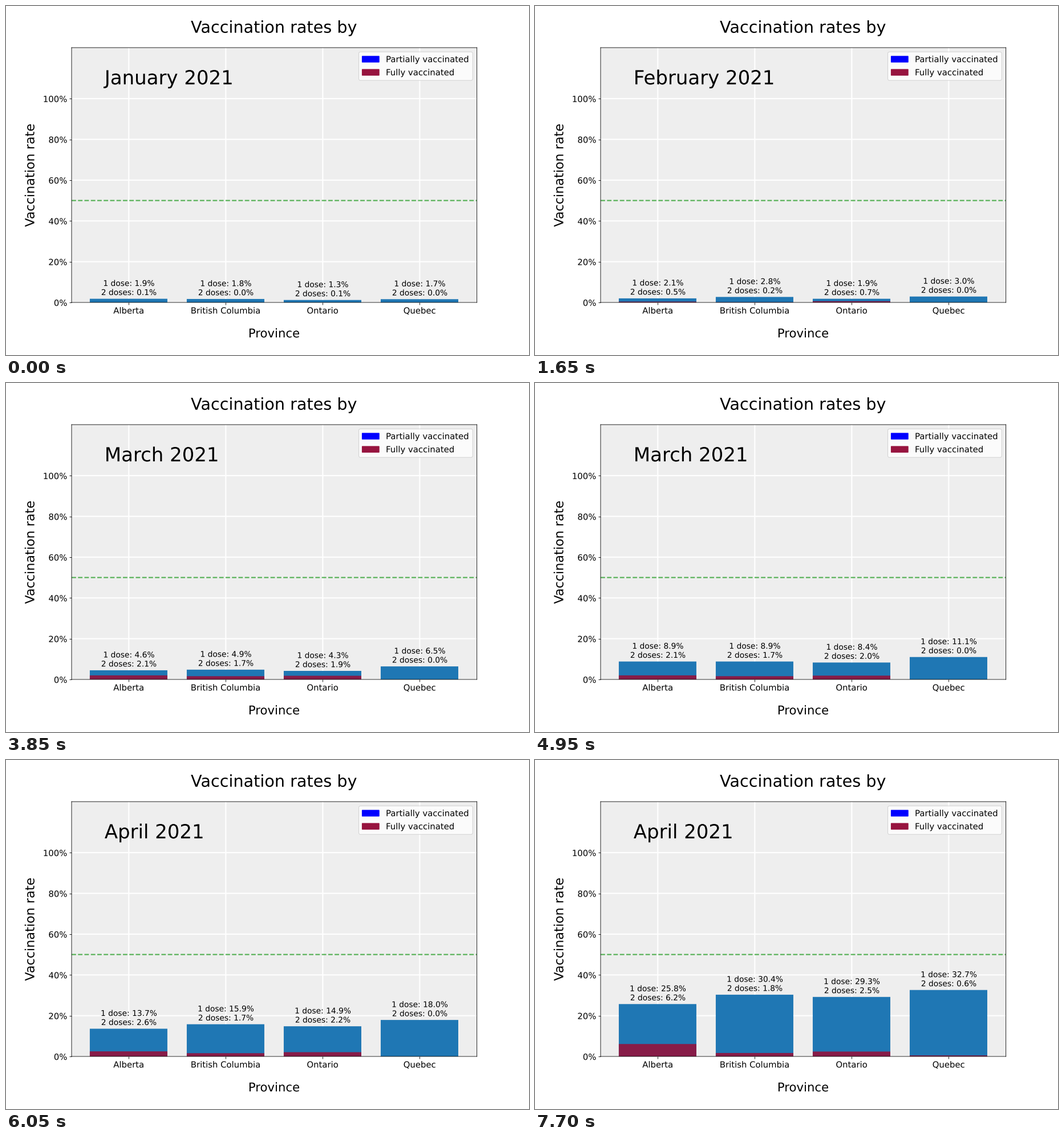
Animation, 917 px wide and 611 px high, one loop 8 s. Source, as a matplotlib script:

```python
import matplotlib.pyplot as plt
import numpy as np
from matplotlib.animation import FuncAnimation
from matplotlib.patches import Patch
from matplotlib.patheffects import Normal
from matplotlib.transforms import Affine2D

W, H, DPI = 917, 611, 64
K = 76.4 / DPI          # point scale: layout is sized for 12 x 8 inches
HALF = 0.38             # pixel offset of grid and frame lines against the bars
TICK_MS, HOLD, FRAMES = 50, 11, 160

PROVINCES = ["Alberta", "British Columbia", "Ontario", "Quebec"]
WEEKS = np.arange(15)

# vaccinated share in percent at a few key weeks, one row per province
FIRST_KEYS = [0, 3, 5, 7, 9, 11, 14]
FIRST = [
    [1.9, 2.1, 2.4, 4.6, 8.9, 13.7, 25.8],
    [1.8, 2.8, 3.2, 4.9, 8.9, 15.9, 30.4],
    [1.3, 1.9, 2.2, 4.3, 8.4, 14.9, 29.3],
    [1.7, 3.0, 4.1, 6.5, 11.1, 18.0, 32.7],
]
SECOND_KEYS = [0, 3, 5, 7, 10, 11, 14]
SECOND = [
    [0.1, 0.5, 1.5, 2.1, 2.1, 2.6, 6.2],
    [0.0, 0.2, 1.1, 1.7, 1.7, 1.7, 1.8],
    [0.1, 0.7, 1.6, 1.9, 2.0, 2.2, 2.5],
    [0.0, 0.0, 0.0, 0.0, 0.0, 0.0, 0.6],
]

# first doses grow exponentially between key weeks, second doses linearly
first = [np.exp(np.interp(WEEKS, FIRST_KEYS, np.log(row))) for row in FIRST]
second = [np.interp(WEEKS, SECOND_KEYS, row) for row in SECOND]

# outline text and unsnapped lines allow sub-pixel placement
plt.rcParams.update({
    "font.family": "DejaVu Sans",
    "font.size": 14 * K,
    "axes.linewidth": 0.8 * K,
    "patch.linewidth": 1.0 * K,
    "path.snap": False,
    "path.effects": [Normal()],
})

fig = plt.figure(figsize=(W / DPI, H / DPI), dpi=DPI, facecolor="white")
ax = fig.add_axes([0.125 + HALF / W, 0.15 + HALF / H, 0.775, 0.73])
ax.set_facecolor("#eeeeee")
ax.set_axisbelow(True)
ax.grid(color="white", linewidth=2 * K, linestyle="-")
ax.set_xticks(range(4), PROVINCES)
ax.set_yticks(range(0, 101, 20), [f"{v}%" for v in range(0, 101, 20)])
ax.tick_params(length=3.5 * K, width=0.8 * K, pad=3.5 * K, labelsize=14 * K)


def label(x, y, text, size, angle=0):
    """Centred text with its baseline at a pixel position from the top left."""
    fig.text(x / W, 1 - y / H, text, fontsize=size * K, rotation=angle,
             rotation_mode="anchor", ha="center", va="baseline")


def make_bars(color):
    bars = ax.bar(range(4), [0] * 4, color=color)
    for bar in bars:
        bar.set_transform(ax.transData + Affine2D().translate(-HALF, -HALF))
    return bars


label(469.9, 46.8, "Vaccination rates by", 27)
label(469.9, 580.2, "Province", 20)
label(49.6, 296.3, "Vaccination rate", 21, 90)

ax.axhline(50, color="#2ca02c", alpha=0.8, linestyle="--", linewidth=2 * K)
ax.legend(
    handles=[Patch(color="#0000ff", label="Partially vaccinated"),
             Patch(color="#97143f", label="Fully vaccinated")],
    loc="upper right", fontsize=14 * K, facecolor="white", labelspacing=0.54,
)

first_bars = make_bars("#1f77b4")
second_bars = make_bars("#871c48")
notes = [
    ax.annotate("", (i, 0), xytext=(0, 3 * K), textcoords="offset points",
                ha="center", va="bottom", fontsize=13 * K, linespacing=1.175)
    for i in range(4)
]
month = ax.text(-0.25, 107, "", fontsize=32 * K)

ax.set_xlim(-0.59, 3.59)
ax.set_ylim(0, 125)


def month_name(week):
    # January shows its last three weeks, later months four each
    return ["January", "February", "March", "April"][(week + 1) // 4]


def update(frame):
    week = frame // HOLD
    month.set_text(f"{month_name(week)} 2021")
    for i, note in enumerate(notes):
        one, two = first[i][week], second[i][week]
        first_bars[i].set_height(one)
        second_bars[i].set_height(two)
        note.xy = (i, one)
        note.set_text(f"1 dose: {one:.1f}%\n2 doses: {two:.1f}%")
    return [month, *notes, *first_bars, *second_bars]


anim = FuncAnimation(fig, update, frames=FRAMES, interval=TICK_MS,
                     init_func=lambda: update(0), repeat=True, repeat_delay=0)
plt.show()
```
